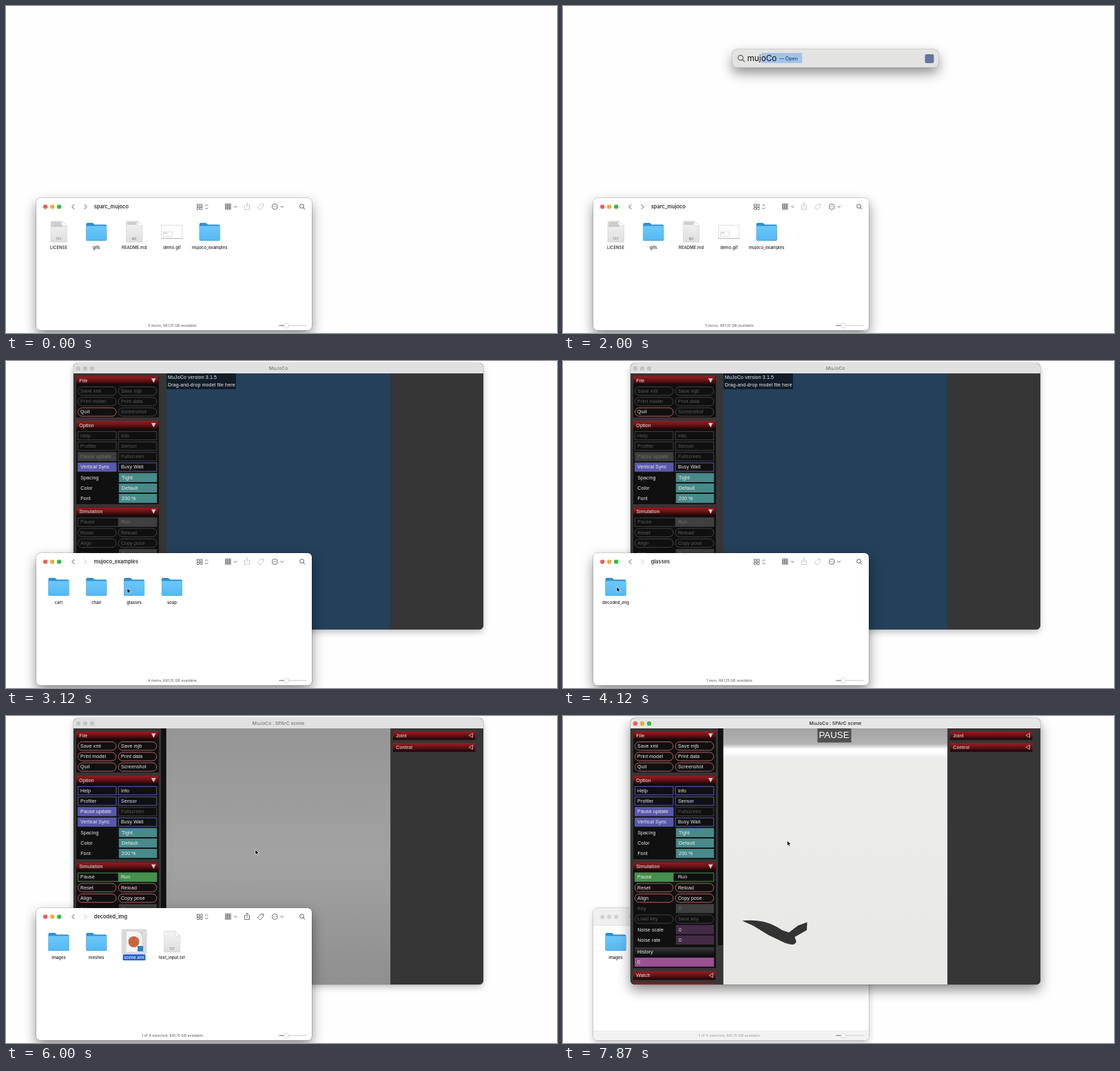
These frames come from a looping animation (800 px wide and 475 px high, 8 s). An HTML page:

```html
<!DOCTYPE html>
<html lang="en">
<head>
<meta charset="utf-8">
<title>Opening a scene</title>
<style>
  html, body { margin: 0; width: 100%; height: 100%; overflow: hidden; background: #fefefe; }
  .layer { position: absolute; }
  .layer svg { display: block; width: 100%; height: 100%; }
  .win { border-radius: 6px; overflow: hidden; }
  #finder { left: 44px; top: 279px; width: 400px; height: 192px; background: #fff; }
  #sim { left: 98px; top: 3px; width: 595px; height: 387px; background: #363636; }
  #bar { left: 246px; top: 62.5px; width: 299px; height: 26.5px; z-index: 5; background: #e3e3e2;
    box-shadow: 0 0 0 .5px #b5b5b5, 0 8px 18px rgba(0,0,0,.45); }
  #top { left: 0; top: 0; width: 800px; height: 475px; z-index: 9; }
  .off { box-shadow: 0 0 0 .5px rgba(0,0,0,.22), 0 4px 10px rgba(0,0,0,.24); }
  .on { box-shadow: 0 0 0 .5px rgba(0,0,0,.28), 0 8px 18px rgba(0,0,0,.45); }
  text { font-family: Inter, "Noto Sans", sans-serif; white-space: pre; }
  #sim .ui { font: 7px "Liberation Sans", Arial, sans-serif; letter-spacing: .15px; }
</style>
</head>
<body>
<svg width="0" height="0" style="position:absolute">
  <defs>
    <linearGradient id="red" x2="0" y2="1"><stop stop-color="#9a1c21"/><stop offset=".45" stop-color="#6b1418"/><stop offset="1" stop-color="#160506"/></linearGradient>
    <linearGradient id="dark" x2="0" y2="1"><stop stop-color="#3a3a3a"/><stop offset="1" stop-color="#0c0c0c"/></linearGradient>
    <linearGradient id="paper" x2="0" y2="1"><stop stop-color="#f3f3f3"/><stop offset="1" stop-color="#dedede"/></linearGradient>
    <linearGradient id="folder" x2="0" y2="1"><stop stop-color="#6cc8fb"/><stop offset="1" stop-color="#54b7f2"/></linearGradient>
    <linearGradient id="fog" x2="0" y2="1"><stop stop-color="#959595"/><stop offset=".5" stop-color="#a2a2a2"/><stop offset="1" stop-color="#8f8f8f"/></linearGradient>
    <linearGradient id="sky" x2="0" y2="1"><stop stop-color="#a2a2a2"/><stop offset=".06" stop-color="#b3b3b3"/><stop offset=".082" stop-color="#fff"/><stop offset=".093" stop-color="#fff"/><stop offset=".115" stop-color="#ececeb"/><stop offset="1" stop-color="#e8e8e7"/></linearGradient>
  </defs>
</svg>
<div id="sim" class="layer win"><svg viewBox="98 3 595 387"></svg></div>
<div id="finder" class="layer win"><svg viewBox="44 279 400 192"></svg></div>
<div id="bar" class="layer win"><svg viewBox="246 62.5 299 26.5"></svg></div>
<div id="top" class="layer"><svg viewBox="0 0 800 475">
  <g id="ghost" opacity=".5"></g>
  <path id="arrow" d="M0 0V7.6L1.8 6 3 8.7 4.3 8.1 3.1 5.5H5.5Z" stroke="#fff" stroke-width=".7"/>
</svg></div>
<script>
const LOOP = 8000, TICK = 125;
const $ = id => document.getElementById(id);
const pane = id => $(id).querySelector('svg');

const rect = (x, y, w, h, fill, more = '') =>
  `<rect x="${x}" y="${y}" width="${w}" height="${h}" fill="${fill}" ${more}/>`;
const dot = (x, y, r, fill, more = '') =>
  `<circle cx="${x}" cy="${y}" r="${r}" fill="${fill}" ${more}/>`;
const line = (d, color, width = .9) =>
  `<path d="${d}" fill="none" stroke="${color}" stroke-width="${width}" stroke-linecap="round" stroke-linejoin="round"/>`;
const label = (x, y, str, size, fill, more = '') =>
  `<text x="${x}" y="${y}" font-size="${size}" fill="${fill}" ${more}>${str}</text>`;
const MID = 'text-anchor="middle"';
const lights = (x, y, on, idle) => ['#ed5f55', '#f2a93b', '#2cbf40']
  .map((c, i) => dot(x + i * 10, y, 3.2, on ? c : idle)).join('');

// ---- file browser ----
const views = {
  root: { title: 'sparc_mujoco', fwd: true, items: [['LICENSE', 'license'], ['gifs', 'folder'],
    ['README.md', 'readme'], ['demo.gif', 'image'], ['mujoco_examples', 'folder']] },
  examples: { title: 'mujoco_examples', items: ['cart', 'chair', 'glasses', 'soap'].map(n => [n, 'folder']) },
  glasses: { title: 'glasses', items: [['decoded_img', 'folder']] },
  decoded: { title: 'decoded_img', items: [['images', 'folder'], ['meshes', 'folder'],
    ['scene.xml', 'xml'], ['text_input.txt', 'txt']] }
};

const sheet = (x, fill, tag = '') =>
  `<path d="M${x - 11.5} 312.5h16.5l6.8 7v23.5h-23.3z" fill="${fill}" stroke="#cfcfcf" stroke-width=".6"/>
   <path d="M${x + 5} 312.5v7h6.8z" fill="#fff" stroke="#c4c4c4" stroke-width=".5"/>` +
  label(x, 339.5, tag, 4.2, '#858585', MID + ' font-weight="500"');
const scribble = (x, rows) => Array.from({ length: rows }, (_, i) =>
  line(`M${x - 10} ${314.2 + i * 1.5}h${i < 3 ? 13 : 15}`, '#a3a3a3', .7)).join('');

const icons = {
  folder: x => `<path d="M${x - 15} 340V317q0-2 2-2h7.500l3 2.600h15.500q2 0 2 2v20.400z" fill="#2f8fd0"/>` +
    rect(x - 15, 319.6, 30, 21.4, 'url(#folder)', 'rx="1.6"') + line(`M${x - 14} 340.700h28`, '#3f9ad6', .6),
  license: x => sheet(x, 'url(#paper)', 'TXT') + scribble(x, 5),
  readme: x => sheet(x, 'url(#paper)', 'MD') + scribble(x, 3),
  txt: x => sheet(x, 'url(#paper)', 'TXT'),
  image: x => rect(x - 15, 318.5, 30, 19.5, '#fff', 'stroke="#d2d2d2" stroke-width=".7"') +
    rect(x - 12.5, 328, 13, 6.5, '#fff', 'stroke="#bbb" stroke-width=".5"') +
    line(`M${x - 11} 330h4`, '#777', .6) + line(`M${x - 15} 337.500h30`, '#a8a8a8', .7),
  xml: x => sheet(x, '#f7f7f7') + dot(x - .5, 328, 8, '#c9663f') + rect(x + 5, 334, 8, 8, '#2b82c2')
};

function item([name, kind], i, selected) {
  const x = 76.5 + i * 54.8, w = name.length * 3.1 + 5;
  return (selected ? rect(x - 18.5, 309.5, 37, 36.5, '#dadada', 'rx="2.5"') +
      rect(x - w / 2, 346.3, w, 8.7, '#1f5fd0', 'rx="1.5"') : '') + icons[kind](x) +
    label(x, 353, name, 6, selected ? '#fff' : '#222', MID + ' font-weight="500"');
}

function toolbar(on, picked) {
  const c = on ? '#4a4a4a' : '#c4c4c4', weak = picked ? c : '#b9b9b9';
  let s = '';
  for (const a of [277.5, 282]) for (const b of [288, 292.5])
    s += rect(a, b, 3, 3, 'none', `stroke="${c}" stroke-width=".7"`);
  s += line('M289.500 290.300l1.800-1.800 1.800 1.800M289.500 293.200l1.800 1.800 1.800-1.800', c, .8);
  for (let i = 0; i < 9; i++)
    s += rect(318.3 + i % 3 * 3, 287.6 + (i / 3 | 0) * 3, 2, 1.9, 'none', `stroke="${c}" stroke-width=".6"`);
  s += line('M331.300 290.800l1.800 1.800 1.800-1.800M399 290.800l1.800 1.800 1.800-1.800', c);
  s += line('M348 289.800h-1.500v5.700h7v-5.700h-1.500M350 292.500v-6M348.200 288l1.800-1.800 1.800 1.800', weak, .8);
  s += line('M365.500 292.300l4.200-4.300 4-.3-.1 3.700-4.400 4.400zM371.900 289.300h.1', weak, .8);
  s += dot(390.3, 291.5, 4, 'none', `stroke="${c}" stroke-width=".8"`);
  s += line('M388.300 291.500h0M390.300 291.500h0M392.300 291.500h0', c, 1);
  return s + dot(429.5, 290.8, 2.9, 'none', `stroke="${c}" stroke-width=".9"`) + line('M431.700 293l2.200 2.200', c, 1);
}

function drawFinder({ view, pick, active }) {
  const v = views[view], n = v.items.length, picked = pick >= 0, c = active ? '#444' : '#c4c4c4';
  const count = picked ? `1 of ${n} selected` : `${n} item${n > 1 ? 's' : ''}`;
  return (active ? '' : rect(44, 279, 400, 25.5, '#efefef') + rect(44, 457.5, 400, 14, '#f2f2f2') +
      line('M44 304.500h400M44 457.500h400', '#dcdcdc', .5)) +
    lights(57.2, 291.6, active, '#d2d2d2') +
    line('M98.800 288.600l-3 3 3 3', c, 1) + line('M114 288.600l3 3-3 3', v.fwd ? c : '#bcbcbc', 1) +
    label(127.8, 294.2, v.title, 7.4, active ? '#333' : '#aaa', 'font-weight="600"') +
    toolbar(active, picked) + v.items.map((it, i) => item(it, i, i === pick)).join('') +
    label(241.5, 466.1, count + ', 881,15 GB available', 5.4, active ? '#707070' : '#a8a8a8', MID + ' font-weight="500"') +
    line('M397 464.200h39', '#d4d4d4', 1.2) + line('M397 464.200h8', '#9d9d9d', 1.4) +
    dot(407.2, 464.2, 3.5, '#fff', 'stroke="#c0c0c0" stroke-width=".6"');
}

// ---- simulator ----
const ui = (x, y, str, fill = '#f0f0f0') => `<text class="ui" x="${x}" y="${y + 2.4}" fill="${fill}">${str}</text>`;
const LEFT = 104.4, RIGHT = 163.2, DIM = '#5d5d5d';

function box(x, y, str, { fill = '#101010', edge = fill, text, r = 0, w = 55.6 } = {}) {
  return rect(x, y - 6, w, 12.2, fill, `rx="${r}" stroke="${edge}"`) + ui(x + 3.7, y, str, text);
}
const OFF = { edge: '#414141', text: DIM }, GREY = { fill: '#3f3f3f', text: '#707070' };
const push = live => ({ ...(live ? { edge: '#b06263' } : OFF), r: 6 });
const check = (live, on) => live ? { edge: '#5c5ab4', fill: on ? '#5a58ab' : '#101010' } : on ? GREY : OFF;
const TEAL = { fill: '#498a8b' }, PLUM = { fill: '#452b48' }, GREEN = { fill: '#45904f' };
const pair = (y, a, sa, b, sb) => box(LEFT, y, a, sa) + box(RIGHT, y, b, sb);
const field = (y, name, val, style, text) => ui(108.2, y, name, text) + box(164.4, y, val, { ...style, w: 54.4 });

function header(x, y, name, open) {
  return rect(x, y - 6.3, 119.5, 12.6, 'url(#red)') + ui(x + 4.3, y, name) +
    (open ? `<path d="M${x + 109} ${y - 3.2}h6.600l-3.300 6.600z" fill="#c9c9c9"/>`
      : line(`M${x + 115.5} ${y - 3}v6l-5-3z`, '#c9c9c9', .8));
}

function leftPanel(live, paused) {
  const p = push(live), body = (y, h) => rect(102, y, 120, h, '#101010');
  const plain = { fill: '#101010' };
  let s = rect(98, 18, 135, 372, '#363636');
  if (live) s += rect(225, 18, 7.6, 315, '#111');
  s += body(22, 60) + header(102, 28.4, 'File', true) + pair(43.6, 'Save xml', p, 'Save mjb', p) +
    pair(58.8, 'Print model', p, 'Print data', p) + pair(74, 'Quit', push(true), 'Screenshot', p);
  s += body(87, 121) + header(102, 93.2, 'Option', true) + pair(108.4, 'Help', check(live), 'Info', check(live)) +
    pair(123.6, 'Profiler', check(live), 'Sensor', check(live)) +
    pair(138.8, 'Pause update', check(live, true), 'Fullscreen', OFF) +
    pair(154, 'Vertical Sync', check(true, true), 'Busy Wait', check(true)) +
    field(169.2, 'Spacing', 'Tight', TEAL) + field(184.4, 'Color', 'Default', TEAL) + field(199.5, 'Font', '200 %', TEAL);
  s += body(212, 154) + header(102, 218.7, 'Simulation', true) +
    rect(LEFT, 228, 114.4, 12.2, '#101010', `stroke="${live ? '#45904f' : '#414141'}"`);
  s += live ? (paused ? box(LEFT, 234, 'Pause', GREEN) + ui(166.900, 234, 'Run')
      : ui(108.1, 234, 'Pause') + box(RIGHT, 234, 'Run', GREEN))
    : ui(108.1, 234, 'Pause', DIM) + box(RIGHT, 234, 'Run', GREY);
  s += pair(249.2, 'Reset', p, 'Reload', p) + pair(264.5, 'Align', p, 'Copy pose', p) +
    field(279.7, 'Key', '0', GREY, DIM) + pair(294.9, 'Load key', push(false), 'Save key', push(false)) +
    field(310.1, 'Noise scale', '0', PLUM) + field(325.2, 'Noise rate', '0', PLUM) +
    rect(104, 336, 115.500, 12.4, 'url(#dark)') + ui(108.1, 342.3, 'History') +
    box(LEFT, 357.5, '0', { fill: '#9b5190', w: 114.4 });
  return s + header(102, 377, 'Watch', false) + rect(102, 387.5, 119.5, 3, '#8a191d');
}

const GLIDER = 'M260 297.500Q274 295.500 290 298.500 305 302 318 311L328 314.500 341 304.500 354.500 299.500 354 311 336.500 321 338.800 328 336 331.500Q331 333 322 329.500L298 318 276 304.500Z';

function drawSim({ scene, front, paused }) {
  const live = scene !== 'empty';
  const fill = { empty: '#24405b', fog: 'url(#fog)', floor: 'url(#sky)' }[scene];
  let s = leftPanel(live, paused) + rect(232.8, 18, 325.5, 372, fill) + rect(558.3, 18, 135, 372, '#363636');
  if (scene === 'floor') s += `<path d="${GLIDER}" fill="#333"/>`;
  if (live) s += header(562, 28.4, 'Joint') + header(562, 45.6, 'Control');
  else s += rect(233, 18, 101, 23, '#111d29') + ui(235, 24, 'MuJoCo version 3.1.5') +
    ui(235, 34.6, 'Drag-and-drop model file here');
  if (paused) s += rect(369.5, 18, 49, 20.5, '#505050') +
    `<text x="393.500" y="32.300" fill="#fff" ${MID} style="font:13.3px 'Liberation Sans',Arial,sans-serif">PAUSE</text>`;
  return s + rect(98, 3, 595, 15, front ? '#e6e6e6' : '#e0e0e0') + lights(105, 10.9, front, '#c3c3c3') +
    label(395.5, 13.2, live ? 'MuJoCo : SPArC scene' : 'MuJoCo', 6.8, front ? '#3a3a3a' : '#858585', MID + ' font-weight="600"');
}

// ---- launcher ----
function drawBar({ typed }) {
  const hit = typed === 'muj', x = 267.500;
  return dot(257.8, 74.7, 3.6, 'none', 'stroke="#555" stroke-width="1.1"') + line('M260.500 77.400l3 3', '#555', 1.2) +
    (hit ? rect(288, 67.8, 59, 14.6, '#a3c1ea') + rect(525.5, 69.5, 13, 13, '#66739c', 'rx="2.5"') +
      label(314, 78.6, '— Open', 7, '#24486f', 'font-weight="500"') : '') +
    label(x, 79.6, typed + (hit ? 'oCo' : ''), 11.8, '#111');
}

// ---- timeline ----
const steps = [
  [0, { view: 'root', pick: -1, active: true, typed: null, arrow: true, sim: false, scene: 'empty', front: false, paused: false, drag: false }],
  [1250, { typed: '' }],
  [1500, { typed: 'm', arrow: false }],
  [1625, { typed: 'mu' }],
  [1750, { typed: 'muj' }],
  [2250, { typed: null, arrow: true }],
  [2375, { pick: 4 }],
  [2500, { view: 'examples', pick: -1 }],
  [2750, { active: false }],
  [3000, { active: true, sim: true }],
  [3375, { pick: 2 }],
  [3625, { view: 'glasses', pick: -1 }],
  [4250, { pick: 0 }],
  [4500, { view: 'decoded', pick: -1 }],
  [5250, { pick: 2 }],
  [5500, { drag: true }],
  [5875, { drag: false, scene: 'fog' }],
  [6250, { scene: 'floor' }],
  [7375, { active: false, front: true, paused: true }]
];
const path = [
  [0, 495, 474], [2250, 495, 474], [2375, 296, 330], [2625, 296, 330], [2750, 230, 331], [3000, 230, 331],
  [3125, 176, 330], [3750, 176, 330], [4125, 78, 328], [4625, 78, 328], [5125, 192, 323.5], [5500, 192, 323.5],
  [5875, 362, 194], [6250, 362, 194], [6750, 214, 207.500], [7000, 134, 233], [7375, 134, 233], [7875, 325.5, 181]
];

const stateAt = t => Object.assign({}, ...steps.filter(s => s[0] <= t).map(s => s[1]));
function pointAt(t) {
  const i = path.findIndex(p => p[0] > t);
  if (i < 0) return path[path.length - 1].slice(1);
  const [t0, x0, y0] = path[i - 1], [t1, x1, y1] = path[i], k = (t - t0) / (t1 - t0);
  return [x0 + (x1 - x0) * k, y0 + (y1 - y0) * k];
}
const show = (el, on) => { el.style.display = on ? '' : 'none'; };

$('ghost').innerHTML = item(views.decoded.items[2], 2, false);
let last = -1;
function render(now) {
  const tick = Math.floor((now % LOOP + 5) / TICK) % (LOOP / TICK);
  if (tick !== last) {
    last = tick;
    const t = tick * TICK, s = stateAt(t), [x, y] = pointAt(t);
    pane('finder').innerHTML = drawFinder(s);
    $('finder').className = 'layer win ' + (s.active ? 'on' : 'off');
    $('finder').style.zIndex = s.front ? 1 : 2;
    show($('sim'), s.sim);
    if (s.sim) pane('sim').innerHTML = drawSim(s);
    $('sim').className = 'layer win ' + (s.front ? 'on' : 'off');
    $('sim').style.zIndex = s.front ? 2 : 1;
    show($('bar'), s.typed !== null);
    if (s.typed !== null) pane('bar').innerHTML = drawBar(s);
    show($('arrow'), s.arrow);
    $('arrow').setAttribute('transform', `translate(${x} ${y})`);
    show($('ghost'), s.drag);
    $('ghost').setAttribute('transform', `translate(${x - 192} ${y - 323.5})`);
  }
}
const start = performance.now();
function loop() {
  render(performance.now() - start);
  requestAnimationFrame(loop);
}
loop();
</script>
</body>
</html>
```
